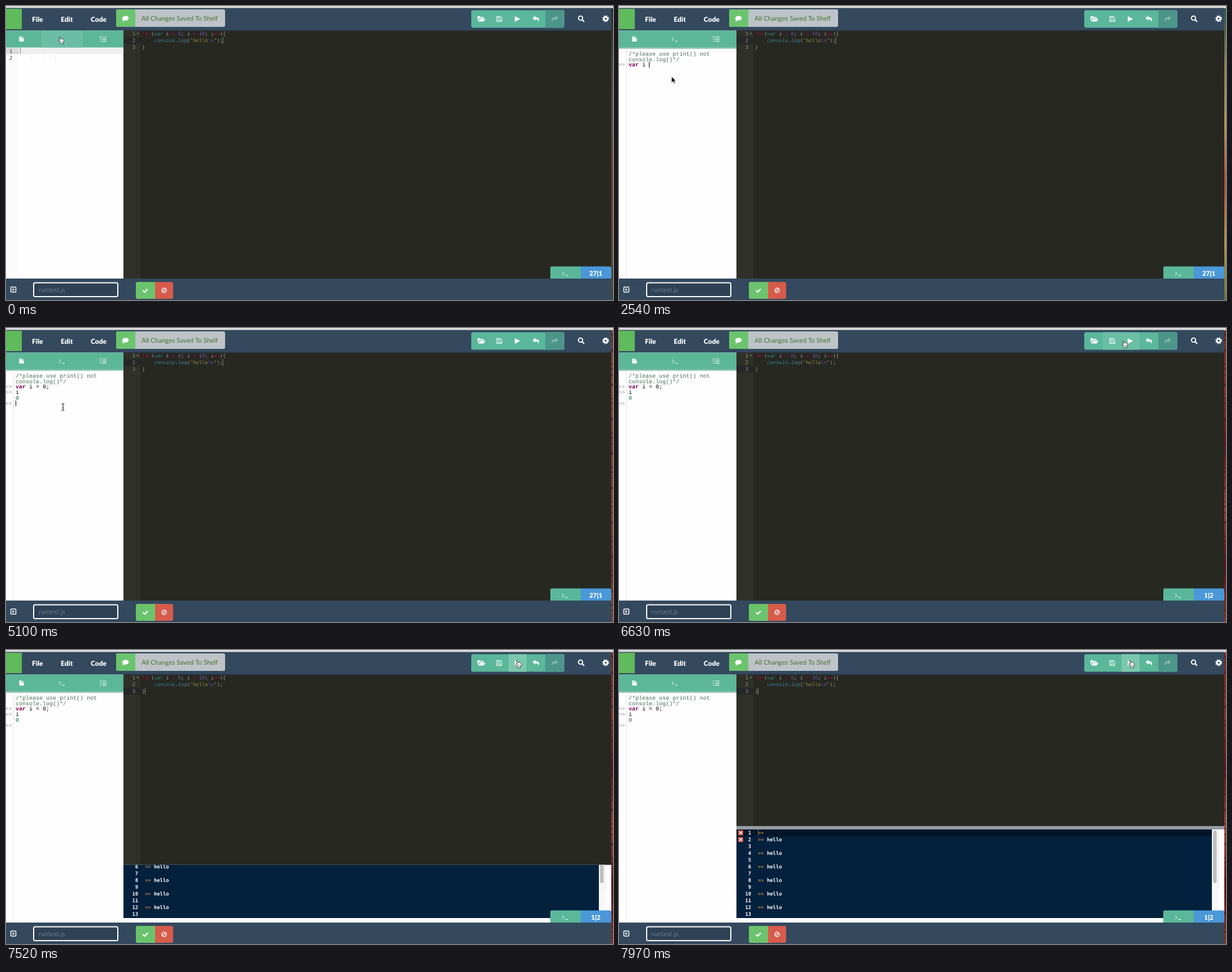
Animation of 1075 by 521 pixels, one loop 8000 ms. Source, as an HTML page:

```html
<!DOCTYPE html>
<html lang="en">
<head>
<meta charset="utf-8">
<title>Code editor</title>
<style>
html, body { margin: 0; width: 100%; height: 100%; overflow: hidden; background: #272822; }
svg { display: block; width: 100vw; height: 100vh; }
text { white-space: pre; text-rendering: geometricPrecision; }
.ui { font: 11.5px Lato, sans-serif; }
.menu { font: 900 12px Lato, sans-serif; fill: #fff; }
.code { font: 8.8px "DejaVu Sans Mono", monospace; fill: #f8f8f2; stroke: currentColor; stroke-width: 0; }
.code tspan, .code .plain { stroke-width: .25px; }
.repl { font: 10px "Liberation Mono", monospace; fill: #000; }
.num { fill: #8f908a; text-anchor: end; }
.out { font: bold 8.8px "DejaVu Sans Mono", monospace; fill: #fff; }
.k { fill: #f92672; } .v { fill: #66d9ef; font-style: italic; }
.n { fill: #ae81ff; } .s { fill: #e6db74; }
.line { fill: none; stroke: #fff; }
</style>
</head>
<body>
<svg viewBox="0 0 1075 521" preserveAspectRatio="none">
  <defs>
    <clipPath id="reveal"><rect id="revealBox" x="208" y="483" width="864" height="0"/></clipPath>
    <g id="prompt" class="line"><path d="M-5-3l3 3-3 3M0 3.5h5"/></g>
    <g id="arrow"><path d="M0 0v11l2.6-2.4 1.8 4 2-.9-1.8-3.9H8z" fill="#111" stroke="#fff" stroke-width=".7"/></g>
    <g id="beam"><path d="M-2.5-6q2 0 2.5 1 .5-1 2.5-1M0-5V5M-2.5 6q2 0 2.5-1 .5 1 2.5 1M-1.2 1.5h2.4" fill="none" stroke="#222" stroke-width="1.1"/></g>
    <g id="hand"><path d="M-3-6q1.5-1 2 .4l1 3 1-.4 1.3.4 1.2-.1 1 .9.9.2.5 1.3-.5 3.1-1 1.2v2h-5l-.5-1.5-3-4q0-1.5 1.5-1l1 .8z" fill="#fff" stroke="#222" stroke-width=".9"/><path d="M-.3 1v2.6M1.6 1v2.6M3.3 1v2.6" stroke="#222" stroke-width=".6"/></g>
    <linearGradient id="edge" x2="0" y2="1"></linearGradient>
  </defs>

  <rect width="1075" height="521" fill="#272822"/>
  <rect width="1075" height="4" fill="#dcdedb"/>
  <rect y="3.5" width="1072" height="40" fill="#34495e"/>
  <rect y="42.5" width="1072" height="1" fill="#2b3b4b"/>
  <rect y="5" width="28" height="36" fill="#5fbb5b"/>
  <g class="menu">
    <text x="46" y="27.5">File</text><text x="97" y="27.5">Edit</text><text x="150" y="27.5">Code</text>
  </g>
  <rect x="195" y="6" width="193" height="31" rx="3" fill="#bdc3c7"/>
  <path d="M198 6h31v31h-31q-3 0-3-3V9q0-3 3-3z" fill="#6bc46d"/>
  <path d="M212 17.5c7 0 7 8 0 8q-1 0-2 0-1.500 2-4 2 1.400-1.500 1.200-2.700c-3-2.500-1-7.300 4.800-7.300z" fill="#fff"/>
  <text class="ui" x="240" y="25.500" fill="#4c7031">All Changes Saved To Shelf</text>

  <rect x="824" y="7.500" width="165" height="31" rx="3" fill="#5bb79a"/>
  <path d="M955 7.500h31q3 0 3 3v25q0 3-3 3h-31z" fill="#4c9689"/>
  <rect id="saveHover" x="857" y="7.500" width="33" height="31" fill="#69bea3"/>
  <rect id="runHover" x="890" y="7.500" width="32" height="31" fill="#7cc7ae"/>
  <g fill="#fff">
    <path d="M835 26v-7q0-1 1-1h3l1 1.500h5q1 0 1 1v1h-7.500zM836 27.500l3.500-5h9.500l-3 5z"/>
    <path d="M901 18l9.500 5-9.500 5z"/>
    <path id="undo" d="M932.500 21.500l5-4.200v2.600q7 0 6.500 4.500 0 2-1.700 3.600 1.400-4.500-4.800-4.500v2.500z"/>
    <path d="M978 21.500l-5-4.200v2.600q-7 0-6.500 4.500 0 2 1.700 3.600-1.400-4.500 4.800-4.500v2.500z" opacity=".3"/>
  </g>
  <g class="line">
    <path d="M869 18.500h7l2 2v7h-9zM871 18.500v3h4v-3M871 27.500v-3h5v3"/>
    <circle cx="1017.500" cy="21.500" r="3.700" stroke-width="2"/>
    <path d="M1020.500 24.500l3.500 3.500" stroke-width="2.300"/>
    <circle cx="1062" cy="22.500" r="3.200" stroke-width="2.800"/>
    <circle cx="1062" cy="22.500" r="5" stroke-width="2" stroke-dasharray="2 1.927"/>
  </g>

  <rect y="43.500" width="208" height="439.500" fill="#fefefe"/>
  <g id="notes">
    <rect y="73" width="22" height="410" fill="#fbfbfb"/>
    <rect y="73.500" width="208" height="12" fill="#efefef"/>
    <rect y="73.500" width="22" height="12" fill="#dcdcdc"/>
    <path d="M25.500 74v11" stroke="#888"/>
    <path d="M45.500 86v11M66.500 86v11M87.500 86v11" stroke="#eee"/>
    <g class="code" style="fill:#333"><text x="6" y="82.500">1</text><text x="6" y="94.500">2</text></g>
  </g>
  <g id="repl" class="repl">
    <path d="M13.500 76v407" stroke="#e6e6e6"/>
    <g fill="#3f7f5f" style="fill:#476b58"><text x="17" y="88">/*please use print() not</text><text x="17" y="97.500">console.log()*/</text></g>
    <g id="prompts" fill="#999"></g>
    <text x="17" y="107"><tspan id="word" font-weight="bold" fill="#7f0055"></tspan><tspan id="rest"></tspan></text>
    <text id="name" x="17" y="117">i</text>
    <text id="value" x="17" y="126.700" fill="#164">0</text>
    <rect id="caret" width="1" height="10" fill="#000"/>
  </g>
  <rect y="43.500" width="208" height="30" fill="#5cb799"/>
  <rect id="tabShade" y="73.500" width="208" height="2" fill="#75b7a1"/>
  <rect id="tabHover" x="63" y="43.500" width="73" height="30" fill="#6bbea4"/>
  <path d="M23.500 54h4v3.500h4V63h-8zM28.500 54l3 2.700h-3z" fill="#fff"/>
  <use href="#prompt" x="99" y="59"/>
  <path class="line" d="M170.500 55h7.500M170.500 58.700h7.500M170.500 62.300h7.500M167.500 53.500v3M166.500 58.700h2M166.500 62.300h2" stroke-width="1.200"/>

  <rect x="208" y="43.500" width="30" height="439.500" fill="#2f3129"/>
  <rect id="gutterLine" x="208" width="30" height="12" fill="#272727"/>
  <g class="code">
    <text class="num" x="229" y="52">1</text><text class="num" x="229" y="64">2</text><text class="num" x="229" y="76">3</text>
    <path d="M231.500 47.700h4l-2 2.600z" fill="#8f908a"/>
    <text x="241" y="52"><tspan class="k">for</tspan><tspan>(</tspan><tspan class="v">var</tspan><tspan> i </tspan><tspan class="k">=</tspan> <tspan class="n">0</tspan><tspan>; i </tspan><tspan class="k">&lt;</tspan> <tspan class="n">10</tspan><tspan>; i</tspan><tspan class="k">++</tspan><tspan>){</tspan></text>
    <text x="262.200" y="64"><tspan class="v">console</tspan><tspan>.</tspan><tspan class="v">log</tspan><tspan>(</tspan><tspan class="s">"hello</tspan><tspan class="n">\n</tspan><tspan class="s">"</tspan><tspan>);</tspan></text>
    <text x="241" y="76"><tspan>}</tspan></text>
  </g>
  <rect id="editCaret" width="1" height="12" fill="#8b8b84"/>

  <g id="console" clip-path="url(#reveal)">
    <rect x="208" y="312" width="864" height="171" fill="#fdfdfd"/>
    <rect x="208" y="318" width="842" height="157" fill="#03213d"/>
    <rect x="208" y="318" width="842" height="12" fill="#02162a"/>
    <g id="output" class="out"></g>
    <rect x="1050" y="318" width="11" height="157" fill="#f7f7f7"/>
    <path d="M1061.500 318v106" stroke="#e3e3e3"/>
    <rect x="1052" y="320" width="6.500" height="93" rx="3" fill="#bfbfbf"/>
    <rect id="handle" x="208" y="312" width="864" height="6" fill="#969da1"/>
    <g id="errors"></g>
  </g>

  <path d="M964 483v-19q0-2.500 2.500-2.500H1018V483z" fill="#5bb799"/>
  <path d="M1018 461.500h51.500q2.500 0 2.500 2.500v19h-54z" fill="#4a97d9"/>
  <use href="#prompt" x="990" y="474"/>
  <text id="position" class="menu" style="font-size:11.500px" x="1044.500" y="477.500" text-anchor="middle"></text>

  <rect y="483" width="1072" height="38" fill="#34495e"/>
  <rect class="line" x="8.500" y="498" width="9" height="9" rx="1" stroke-width="1.500"/>
  <path d="M11.500 500l4 2.500-4 2.500z" fill="#fff"/>
  <rect x="49" y="490.500" width="149" height="24.500" rx="2.500" fill="#2f4255" stroke="#fff" stroke-width="2"/>
  <text class="ui" x="58" y="506.500" fill="#677b8c">runtest.js</text>
  <rect x="230" y="489" width="66" height="30" rx="3" fill="#d65b4b"/>
  <path d="M264 489v30h-31q-3 0-3-3v-24q0-3 3-3z" fill="#6bc46d"/>
  <path class="line" d="M242.500 504l3 3 5.500-5.500" stroke-width="2.200"/>
  <circle class="line" cx="280" cy="504" r="4" stroke-width="1.500"/><path class="line" d="M277.500 506.500l5-5" stroke-width="1.500"/>

  <rect x="1072" y="4" width="3" height="517" fill="url(#edge)"/>
  <path id="edgeMarks" d="M1073.500 10v511" stroke="#3b1612" stroke-width="3" stroke-dasharray="3 8 2 14 5 21 2 6" opacity=".55"/>
  <use id="mouse"/>
</svg>

<script>
const LOOP = 8000;
const $ = id => document.getElementById(id);
const show = (id, on) => $(id).setAttribute('visibility', on ? 'visible' : 'hidden');
const set = (id, attrs) => {
  for (const key in attrs) $(id).setAttribute(key, attrs[key]);
};
// Last row whose start time has been reached.
const at = (rows, t) => rows.findLast(row => row[0] <= t);

const TYPED = 'var i = 0;';
const typing = [[0, 0], [1950, 1], [2100, 3], [2250, 4], [2390, 5], [2540, 6],
  [2990, 7], [3140, 8], [3280, 9], [3430, 10]];

const mouse = [
  [0, 'hand', 97, 61], [510, 'hand', 97, 66], [690, 'arrow', 95, 90],
  [860, 'arrow', 94, 114], [1040, 'arrow', 93, 125],
  [4170, 'beam', 125, 143], [4320, 'beam', 143, 146], [4770, 'beam', 101, 140],
  [5270, 'beam', 145, 122], [5410, 'beam', 210, 96], [5560, 'beam', 256, 77],
  [5890, 'beam', 290, 75], [6040, 'beam', 410, 68], [6190, 'beam', 610, 56],
  [6330, 'arrow', 780, 38], [6480, 'hand', 870, 32], [6630, 'hand', 895, 29],
  [6780, 'hand', 903, 27], [6920, 'hand', 907, 25]
];

const edges = [
  [0, ['#242c26', '#4c4632', '#5e5038', '#6e3c2c', '#654a30', '#424a30']],
  [690, ['#30523e', '#78734e', '#a28b54', '#93513c', '#a28542', '#5d6b35']],
  [1210, ['#285c42', '#8c8251', '#b29955', '#b04f3a', '#b49747', '#66773a']],
  [4770, ['#713b2a', '#92503a', '#7d3e2b', '#934d36', '#703725', '#83432f']],
  [5710, ['#7c2a20', '#8e3528', '#5c1713', '#a24635', '#561411', '#8c3428']]
];

const panelSteps = [7370, 7520, 7670, 7820, 7970];
const PANEL_START = 7295, PANEL_TIME = 400, PANEL_HEIGHT = 171;

const promptY = [107, 117, 136.5];
$('prompts').innerHTML = promptY.map(y => `<text x="-1.500" y="${y}">&gt;&gt;</text>`).join('');

$('output').innerHTML = Array.from({ length: 13 }, (_, i) => {
  const y = 327 + 12 * i;
  const mark = i === 0 || i % 2 ? `<text x="246" y="${y}" fill="#ff9d00" style="fill:#f29a38;font-weight:400">&gt;&gt;</text>` : '';
  const word = i % 2 ? `<text x="262" y="${y}">hello</text>` : '';
  return `<text x="234" y="${y}" text-anchor="end">${i + 1}</text>${mark}${word}`;
}).join('') + '<path d="M246.500 318v12" stroke="#777"/>';

$('errors').innerHTML = [324, 336].map(y =>
  `<rect x="211" y="${y - 4.5}" width="9" height="9" rx="1" fill="#c9513f"/>
   <path class="line" d="M213 ${y - 2.5}l5 5m0-5l-5 5" stroke-width="1.400"/>`).join('');

function drawRepl(t) {
  const count = at(typing, t)[1];
  const row = t < 3730 ? 0 : t < 4030 ? 1 : 2;
  const column = row === 0 ? count : row === 1 && t >= 3880 ? 1 : 0;
  $('word').textContent = TYPED.slice(0, Math.min(count, 3));
  $('rest').textContent = TYPED.slice(3, Math.max(count, 3));
  [...$('prompts').children].forEach((el, i) =>
    el.setAttribute('visibility', i <= row && t >= 330 ? 'visible' : 'hidden'));
  show('name', t >= 3880);
  show('value', t >= 4030);
  set('caret', { x: 17 + 6 * column, y: promptY[row] - 8 });
  show('caret', t >= 330 && !(t >= 1650 && t < 1950) && t < 5710);
}

function drawPanel(t) {
  const step = panelSteps.findLast(s => s <= t) || 0;
  const p = Math.min(1, Math.max(0, (step - PANEL_START) / PANEL_TIME));
  const height = PANEL_HEIGHT * (0.5 - Math.cos(Math.PI * p) / 2);
  set('revealBox', { y: 483 - height, height });
  show('handle', step >= 7670);
  show('errors', step >= 7820);
}

let edgeNow;
function drawEdge(t) {
  const [start, colors] = at(edges, t);
  if (start === edgeNow) return;
  edgeNow = start;
  $('edge').innerHTML = colors.map((c, i) =>
    `<stop offset="${i / (colors.length - 1)}" stop-color="${c}"/>`).join('');
  show('edgeMarks', start >= 4770);
}

function draw(t) {
  const opened = t >= 330, clicked = t >= 5710;
  const [, kind, x, y] = at(mouse, t);
  $('notes').style.display = opened ? 'none' : '';
  $('repl').style.display = opened ? '' : 'none';
  show('tabShade', opened);
  show('tabHover', t < 690);
  drawRepl(t);
  set('gutterLine', { y: clicked ? 67 : 55 });
  set('editCaret', clicked ? { x: 246, y: 67 } : { x: 383.5, y: 55 });
  show('editCaret', !(t >= 6330 && t < 6920));
  $('position').textContent = clicked ? '1|2' : '27|1';
  show('saveHover', t >= 6480 && t < 6780);
  show('runHover', t >= 6630);
  $('runHover').setAttribute('opacity', t < 6780 ? 0.5 : 1);
  drawPanel(t);
  drawEdge(t);
  set('mouse', { href: '#' + kind, x, y });
}

const begin = performance.now();
function tick() {
  draw((performance.now() - begin) % LOOP);
  requestAnimationFrame(tick);
}
tick();
</script>
</body>
</html>
```
